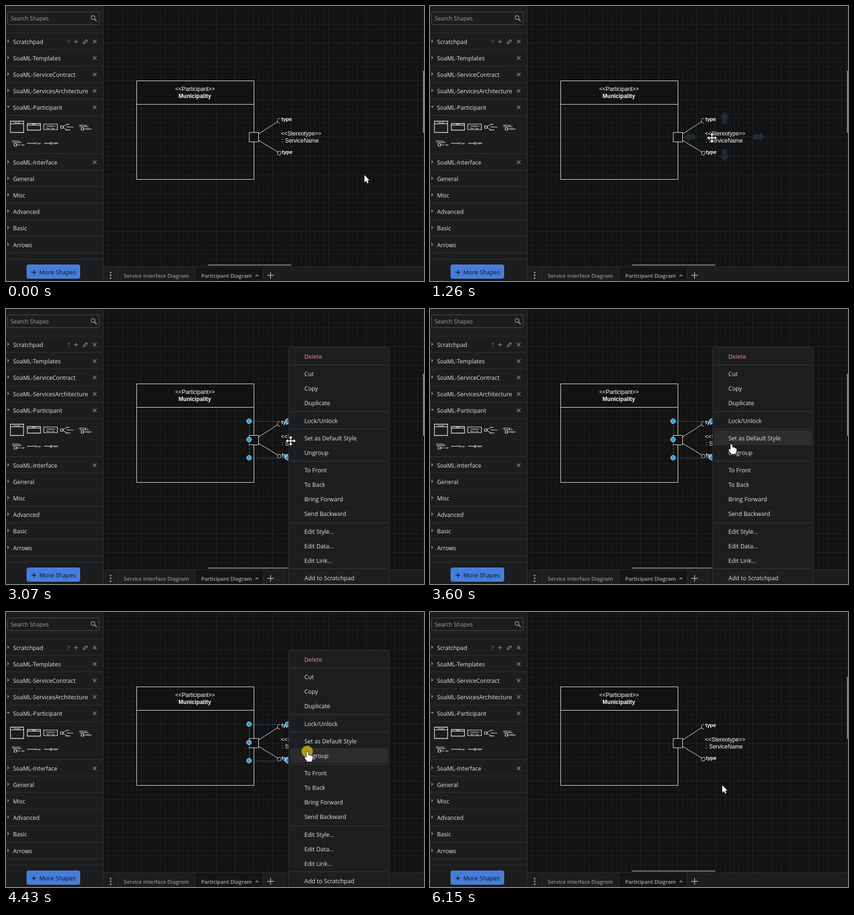
An HTML page with a canvas that plays this animation: 891x586 px, repeating every 7.31 s.

```html
<!DOCTYPE html>
<html lang="en">
<head>
<meta charset="utf-8">
<title>Ungrouping a port</title>
<style>
html, body { margin: 0; width: 100%; height: 100%; overflow: hidden; background: #121212; }
canvas { display: block; }
</style>
</head>
<body>
<canvas id="stage" width="891" height="586"></canvas>
<script>
const LOOP = 7310;
const W = 891, H = 586;
const BG = '#121212', PANEL = '#1b1d1f', LINE = '#303234', INK = '#ffffff', BLUE = '#2a9fe3';
const UI = '"Open Sans", "Noto Sans", sans-serif';
const SANS = '"Liberation Sans", Arial, sans-serif';
const ctx = document.getElementById('stage').getContext('2d');

// ---------- drawing helpers ----------
function fill(x, y, w, h, color) {
  ctx.fillStyle = color;
  ctx.fillRect(x, y, w, h);
}
function stroke(color, width = 1, dash = []) {
  ctx.strokeStyle = color;
  ctx.lineWidth = width;
  ctx.setLineDash(dash);
  ctx.stroke();
  ctx.setLineDash([]);
}
function path(points, close) {
  ctx.beginPath();
  for (let i = 0; i < points.length; i += 2) ctx.lineTo(points[i], points[i + 1]);
  if (close) ctx.closePath();
}
function line(points, color = INK, width = 1) {
  path(points);
  stroke(color, width);
}
function poly(points, color) {
  path(points, true);
  ctx.fillStyle = color;
  ctx.fill();
}
function box(x, y, w, h, color = INK, width = 1, dash) {
  ctx.beginPath();
  ctx.rect(x, y, w, h);
  stroke(color, width, dash);
}
function round(x, y, w, h, r, color, edge) {
  ctx.beginPath();
  ctx.roundRect(x, y, w, h, r);
  ctx.fillStyle = color;
  ctx.fill();
  if (edge) stroke(edge);
}
function disc(x, y, r, color, edge, width = 1) {
  ctx.beginPath();
  ctx.arc(x, y, r, 0, 7);
  if (color) { ctx.fillStyle = color; ctx.fill(); }
  if (edge) stroke(edge, width);
}
function text(str, x, y, font, color = INK, align = 'left') {
  ctx.font = font;
  ctx.fillStyle = color;
  ctx.textAlign = align;
  ctx.fillText(str, x, y);
}
function cross(x, y, r, color, width) {
  line([x - r, y - r, x + r, y + r], color, width);
  line([x - r, y + r, x + r, y - r], color, width);
}
function plus(x, y, r, color, width) {
  line([x - r, y, x + r, y], color, width);
  line([x, y - r, x, y + r], color, width);
}

// ---------- fixed parts ----------
function grid() {
  fill(208, 0, W - 208, 555, BG);
  for (const [step, color] of [[10, '#1a1a1a'], [40, '#262626']]) {
    for (let x = 208 + step; x < W; x += step) fill(x, 0, 1, 555, color);
    for (let y = 39 % step; y < 555; y += step) fill(208, y, W - 208, 1, color);
  }
}

const rows = [
  ['Scratchpad', 76, 1], ['SoaML-Templates', 111, 1], ['SoaML-ServiceContract', 146, 1],
  ['SoaML-ServicesArchitecture', 181, 1], ['SoaML-Participant', 216, 1, 1], ['SoaML-Interface', 333, 1],
  ['General', 368], ['Misc', 403], ['Advanced', 438], ['Basic', 473], ['Arrows', 509]
];

function sidebar() {
  fill(0, 0, 208, H, PANEL);
  fill(207, 0, 1, H, LINE);
  round(3.5, 12.5, 195, 27, 3, '#1b1d1f', '#505254');
  text('Search Shapes', 10, 31, '12px ' + UI, '#a0a0a0');
  disc(185.5, 24.5, 4, null, '#9a9a9a', 1.6);
  line([188.5, 27.5, 193, 32], '#9a9a9a', 2.2);

  for (const y of [57, 92, 127, 163, 198, 233, 314, 349, 384, 420, 455, 490, 525, 539])
    fill(0, y, 207, 1, LINE);
  for (const [name, y, closable, open] of rows) {
    poly(open ? [1, y - 3, 9, y - 3, 5, y + 1] : [3, y - 5, 7, y - 1, 3, y + 3], '#7d7f80');
    text(name, 15, y + 5, '12.4px ' + UI, '#e6e6e6');
    if (closable) cross(189, y, 3.8, '#a8a8a8', 1.2);
  }
  text('?', 131, 81, '12px ' + UI, '#8c8c8c');
  plus(149, 76, 4, '#a0a0a0', 1.2);
  path([164.5, 80.5, 165.5, 77, 171, 71.5, 173.5, 74, 168, 79.5], true);
  stroke('#a0a0a0', 1.2);
  thumbnails();

  round(44.5, 551.5, 113, 29, 3, '#467ddb', '#5a8ee6');
  plus(59.5, 567.5, 5, '#121212', 1.5);
  text('More Shapes', 71, 572, '12.8px ' + UI, '#121212');
}

function tiny(str, x, y, size = 4, align) {
  text(str, x, y, `bold ${size}px ${SANS}`, INK, align);
}
function thumbnails() {
  box(9.5, 245.5, 28, 24, '#eee', 1.3);
  line([9, 251, 38, 251], '#eee', 1.2);
  tiny('Participant', 23.5, 249.5, 2.6, 'center');
  box(45.5, 250.5, 28, 14, '#eee', 1.3);
  line([45, 254, 74, 254], '#eee', 1.3);
  tiny('Agent', 59.5, 253, 2.6, 'center');
  box(80.5, 251.5, 29, 12, '#eee', 1.2);
  tiny('<<Capability>>', 95, 257, 3, 'center');
  tiny('Name : Type', 95, 261.5, 3, 'center');

  box(116.5, 255.5, 5, 5, '#eee', 1.2);
  line([129, 252, 122, 257], '#eee');
  line([122, 259, 129, 264], '#eee');
  disc(129, 264, 1.2, null, '#eee');
  tiny('type', 129, 253, 3);
  tiny('<Service>', 129, 258.5, 3.2);
  tiny('type', 131, 265, 3);

  for (const [x, y, ring] of [[160.5, 259.5, 1], [17.5, 293.5, 0]]) {
    tiny('<<Service>>', x - 5.5, y - 4.5, 3.1);
    tiny(': ServiceName', x - 5.5, y - 1.5, 3.1);
    box(x, y, 5, 5, '#eee', 1.2);
    line([x + 5, y + 2.5, x + 13, y + 2.5], '#eee');
    if (ring) disc(x + 14, y + 2.5, 1.3, null, '#eee');
    tiny('type', x + 15, y + 3, 3.6);
  }
  line([45, 292.5, 63, 292.5], '#eee', 1.2);
  ctx.beginPath();
  ctx.arc(65, 292.5, 2, 1.6, 4.7);
  stroke('#eee');
  tiny('type', 66, 293.5, 4.2);
  line([81, 292.5, 94, 292.5], '#eee', 1.2);
  disc(96.5, 292.5, 2, null, '#eee', 1.2);
  tiny('type', 101, 293.5, 4.8);
}

function tabs() {
  fill(208, 555, W - 208, 31, PANEL);
  fill(404, 556, 144, 30, '#141516');
  fill(208, 555, W - 208, 1, LINE);
  for (const x of [238, 403, 548]) fill(x, 556, 1, 30, LINE);
  for (const y of [568, 574, 580]) disc(223, y, 1.8, '#a4a4a4');
  const font = '600 11.2px ' + UI;
  text('Service Interface Diagram', 251, 579, font, '#8f9092');
  text('Participant Diagram', 416, 579, font, '#a9aaab');
  line([532, 576, 535, 573, 538, 576], '#b0b0b0', 1.5);
  plus(564, 574, 7, '#a4a4a4', 1.8);
}

function diagram() {
  fill(278, 159, 251, 51, BG);
  box(278.5, 159.5, 250, 210);
  line([278, 209.5, 529, 209.5]);
  text('<<Participant>>', 403, 181, '12px ' + SANS, INK, 'center');
  text('Municipality', 402.5, 196, 'bold 12px ' + SANS, INK, 'center');

  line([538, 273, 579, 246.5]);
  line([538, 286, 579, 311]);
  fill(518, 269, 21, 21, BG);
  box(518.5, 269.5, 20, 20);
  ctx.beginPath();
  ctx.arc(583.5, 244.5, 5, 1.4, 4.9);
  stroke(INK);
  disc(582.5, 313.5, 4, BG, INK);
  text('type', 587, 245, 'bold 11px ' + SANS);
  text('type', 588, 315, 'bold 11px ' + SANS);
  text('<<Stereotype>>', 586, 276, '12px ' + SANS);
  text(': ServiceName', 588, 291, '12px ' + SANS);
}

function scrollbars(alpha) {
  ctx.globalAlpha = alpha;
  fill(430, 551, 178, 2, '#8b8b8b');
  fill(889, 138, 2, 132, '#8b8b8b');
  ctx.globalAlpha = 1;
}

// ---------- selection, hover, menu ----------
function handle(x, y) { disc(x, y, 5, BLUE, '#e8f4fb'); }

function groupSelection() {
  box(518.5, 239.5, 165, 78, '#1f86c2', 1, [3, 3]);
  for (const x of [518, 600, 683])
    for (const y of [239, 278, 317])
      if (x !== 600 || y !== 278) handle(x, y);
  ctx.beginPath();
  ctx.arc(695, 227, 4.8, -0.5, 4.1);
  stroke(BLUE, 2);
  poly([692, 220, 699, 220, 696, 227], BLUE);
}

function partSelection() {
  box(573.5, 259.5, 110, 40, '#5a5a5a', 1, [3, 3]);
  fill(518, 269, 21, 21, BG);
  box(518.5, 269.5, 20, 20, '#9ccdea', 1, [3, 3]);
  for (const x of [509, 528, 547])
    for (const y of [260, 279, 298])
      if (x !== 528 || y !== 279) handle(x, y);
  ctx.globalAlpha = 0.4;
  disc(558, 259, 5, BLUE);
  disc(558, 298, 5, BLUE);
  ctx.globalAlpha = 1;
  line([538, 272, 578, 245], '#b9dcf0');
  line([538, 285, 578, 310], '#b9dcf0');
  for (const [x, y, r] of [[538, 272, 5.5], [538, 285, 5.5], [578, 245, 6.8], [578, 310, 6.8]]) {
    disc(x, y, r, BLUE, '#d5ecf8');
    disc(x, y, r / 2, null, '#d5ecf8');
  }
}

function hoverArrows() {
  const spots = [[628, 225, 0], [715.5, 279, 1], [628, 331.5, 2], [540, 279, 3]];
  for (const [x, y, turn] of spots) {
    ctx.save();
    ctx.translate(x, y);
    ctx.rotate(turn * Math.PI / 2);
    poly([0, 0, 9.5, 12, 5.5, 12, 5.5, 26, -5.5, 26, -5.5, 12, -9.5, 12], '#1e2b33');
    ctx.restore();
  }
}

const items = [
  ['Delete', 101], ['Cut', 138], ['Copy', 169], ['Duplicate', 200], ['Lock/Unlock', 238],
  ['Set as Default Style', 275], ['Ungroup', 306], ['To Front', 343], ['To Back', 374],
  ['Bring Forward', 405], ['Send Backward', 436], ['Edit Style...', 474], ['Edit Data...', 505],
  ['Edit Link...', 536], ['Add to Scratchpad', 573]
];

function menu(active) {
  ctx.shadowColor = 'rgba(0,0,0,0.5)';
  ctx.shadowBlur = 5;
  round(602.5, 81.5, 215, 520, 4, '#1c1e20');
  ctx.shadowBlur = 0;
  ctx.shadowColor = 'transparent';
  ctx.beginPath();
  ctx.roundRect(602.5, 81.5, 215, 520, 4);
  stroke('#36383a');
  if (active) fill(606, active - 16, 208, 31, '#2d2d2e');
  for (const y of [119, 218, 255, 324, 455, 553]) fill(606, y, 208, 1, '#3c3e40');
  for (const [name, y] of items)
    text(name, 636, y + 5, '12.5px ' + UI, y === 101 ? '#f58e93' : '#e6e6e6');
}

function tooltip() {
  fill(642, 318, 75, 22, '#2b2b2b');
  box(642.5, 318.5, 74, 21, '#666');
  text('Ctrl+Shift+U', 679.5, 333, '11px ' + UI, '#f0f0f0', 'center');
}

// ---------- pointer ----------
const cursors = {
  arrow() {
    path([1, 1, 1, 17, 4.6, 13.6, 7.2, 19, 9.8, 17.8, 7.3, 12.6, 12, 12.4], true);
  },
  hand() {
    ctx.beginPath();
    ctx.moveTo(-1.5, 13);
    ctx.lineTo(-1.5, 2.5);
    ctx.quadraticCurveTo(0.5, -0.5, 2.5, 2.5);
    ctx.lineTo(2.5, 8);
    ctx.quadraticCurveTo(5, 6.5, 6, 8.7);
    ctx.quadraticCurveTo(8.5, 7.5, 9, 10);
    ctx.quadraticCurveTo(11, 9, 11.5, 11.5);
    ctx.lineTo(11.5, 16);
    ctx.lineTo(9, 22);
    ctx.lineTo(0.5, 22);
    ctx.quadraticCurveTo(-3, 18, -5.5, 13.5);
    ctx.quadraticCurveTo(-5, 10.5, -1.5, 13);
    ctx.closePath();
  },
  move() {
    const arm = [1, -1, 1, -6, 4, -6, 0, -10.5, -4, -6, -1, -6, -1, -1];
    const points = [];
    for (let k = 0; k < 4; k++) {
      for (let i = arm.length - 2; i >= 0; i -= 2) {
        let x = arm[i], y = arm[i + 1];
        for (let n = 0; n < k; n++) [x, y] = [-y, x];
        points.push(x, y);
      }
    }
    path(points, true);
  }
};
function pointer(kind, x, y) {
  ctx.save();
  ctx.translate(x, y);
  cursors[kind]();
  ctx.lineJoin = 'round';
  stroke('#000', 1.6);
  ctx.fillStyle = '#fff';
  ctx.fill();
  ctx.restore();
}

// start, end, steps, target of each pointer move
const START = [763, 359];
const moves = [
  [330, 460, 3, 753, 353],
  [600, 1260, 11, 601, 281],
  [3070, 3270, 4, 642, 281],
  [3600, 3600, 1, 642, 287],
  [3660, 3790, 3, 642, 297],
  [5050, 5050, 1, 641, 302],
  [5130, 5610, 7, 622, 368]
];
const ease = p => p * p * (3 - 2 * p);

function stepped(t, t0, t1, n) {
  if (t < t0) return 0;
  if (t >= t1) return 1;
  return (Math.floor((t - t0) / (t1 - t0) * (n - 1)) + 1) / n;
}
function position(t) {
  let [x, y] = START;
  for (const [t0, t1, n, toX, toY] of moves) {
    const p = ease(stepped(t, t0, t1, n));
    x += (toX - x) * p;
    y += (toY - y) * p;
  }
  return [Math.round(x), Math.round(y)];
}

// ---------- scene ----------
function draw(t) {
  const during = (a, b) => t >= a && t < b;
  const [x, y] = position(t);
  const overGroup = t < 1660 && x < 684 && y < 319;
  const menuOpen = during(2390, 4580);

  grid();
  diagram();
  if (overGroup || during(1660, 1720) || during(5050, 5200)) hoverArrows();
  if (during(1720, 4580)) groupSelection();
  if (during(4580, 6150)) partSelection();

  let bars = 1;
  if (during(3600, 4130)) bars = 1 - Math.floor((t - 3600) / 66.25) / 8;
  else if (during(4130, 5050)) bars = 0;
  scrollbars(bars);
  tabs();
  sidebar();

  if (menuOpen) menu(t < 3140 ? 0 : t < 3660 ? 275 : 306);
  if (during(4270, 4430)) tooltip();

  const yellow = during(1660, 1790) || during(4430, 4580) || during(6000, 6150);
  if (yellow) disc(x, y, 12, 'rgba(190,174,20,0.88)');
  let kind = 'arrow';
  if (overGroup || during(1660, 3140) || during(5050, 5130)) kind = 'move';
  else if (during(3140, 5050)) kind = 'hand';
  pointer(kind, x, y);
  if (during(2260, 2390)) disc(x, y, 12, 'rgba(214,22,28,0.6)');
}

const begin = performance.now();
function frame() {
  draw((performance.now() - begin) % LOOP);
  requestAnimationFrame(frame);
}
frame();
</script>
</body>
</html>
```
